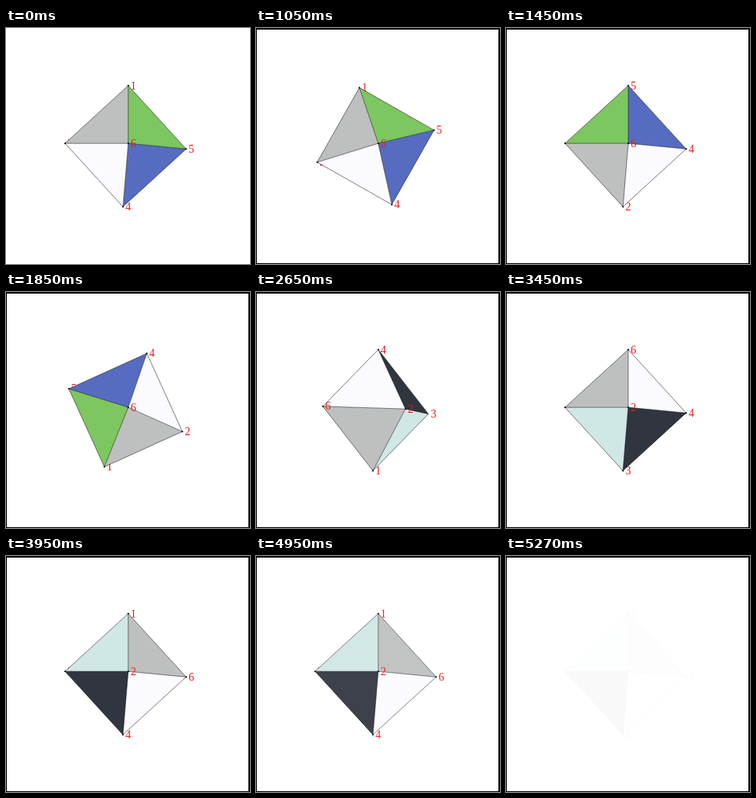
Write an HTML page with a canvas that moves like this. It is 305x295 px and loops after 5.33 s.

```html
<!DOCTYPE html>
<html lang="en">
<head>
<meta charset="utf-8">
<title>Turning octahedron</title>
<style>
  html, body { margin: 0; width: 100%; height: 100%; overflow: hidden; background: #fff; }
  canvas { display: block; }
</style>
</head>
<body>
<canvas id="stage" width="305" height="295"></canvas>
<script>
const ctx = document.getElementById('stage').getContext('2d');
const W = 305, H = 295;
const LOOP = 5330, HOLD = 1000, STEP = 50, FADE = 4950, FADE_STEP = 20;

const VERTS = {
  1: [0, 1, 0], 2: [-1, 0, 0], 3: [0, 0, -1],
  4: [0, -1, 0], 5: [1, 0, 0], 6: [0, 0, 1]
};
const FACES = [
  [1, 2, 6, '#bec0bf'], [1, 5, 6, '#7cc75f'],
  [4, 5, 6, '#566cc0'], [2, 4, 6, '#fafaff'],
  [1, 2, 3, '#cfe7e5'], [2, 3, 4, '#303540']
];

const rad = deg => deg * Math.PI / 180;
const clamp = (v, lo, hi) => Math.min(hi, Math.max(lo, v));

function spinZ([x, y, z], deg) {
  const c = Math.cos(rad(deg)), s = Math.sin(rad(deg));
  return [x * c - y * s, x * s + y * c, z];
}

function spinY([x, y, z], deg) {
  const c = Math.cos(rad(deg)), s = Math.sin(rad(deg));
  return [x * c - z * s, y, x * s + z * c];
}

// Slightly tilted orthographic view
function project([x, y, z]) {
  return {
    x: 149.5 + 75.7 * x + 3.3 * y + 3.3 * z,
    y: 147.7 + 3.5 * x - 75.7 * y - 3.5 * z,
    depth: z - 0.04 * x - 0.047 * y
  };
}

// Half turn in the plane, quarter turn about the upright axis, half turn back
function pose(n) {
  const points = {};
  for (const id in VERTS) {
    let v = spinZ(VERTS[id], 9 * clamp(n, 0, 20));
    v = spinY(v, 4.5 * clamp(n - 20, 0, 20));
    points[id] = project(spinZ(v, -9 * clamp(n - 40, 0, 20)));
  }
  return points;
}

function drawLabel(id, p) {
  ctx.fillStyle = '#f01818';
  ctx.fillText(id, p.x + 3, p.y + 4.5);
}

function drawDot(p) {
  ctx.fillStyle = '#000';
  ctx.beginPath();
  ctx.arc(p.x, p.y, 1, 0, 2 * Math.PI);
  ctx.fill();
}

function drawFace(pts, [a, b, c, color]) {
  ctx.fillStyle = color;
  ctx.beginPath();
  for (const id of [a, b, c]) ctx.lineTo(pts[id].x, pts[id].y);
  ctx.fill();
}

// Each edge once, even when two faces share it
function drawEdges(pts, faces) {
  const edges = new Set(faces.flatMap(([a, b, c]) => [`${a}${b}`, `${b}${c}`, `${a}${c}`]));
  ctx.strokeStyle = '#000';
  ctx.lineWidth = 0.5;
  for (const [a, b] of edges) {
    ctx.beginPath();
    ctx.moveTo(pts[a].x, pts[a].y);
    ctx.lineTo(pts[b].x, pts[b].y);
    ctx.stroke();
  }
}

function drawSolid(n) {
  const pts = pose(n);
  const ids = Object.keys(pts);
  const isFront = id => pts[id].depth > 0.3;
  const label = id => drawLabel(id, pts[id]);
  const visible = FACES.filter(([a, b, c]) =>
    pts[a].depth + pts[b].depth + pts[c].depth > 0);

  ids.filter(id => !isFront(id)).forEach(label);
  visible.forEach(face => drawFace(pts, face));
  drawEdges(pts, visible);
  ids.filter(id => pts[id].depth > -0.3).forEach(id => drawDot(pts[id]));
  ids.filter(isFront).forEach(label);
}

function drawBorder() {
  ctx.fillStyle = '#000';
  ctx.fillRect(0, 0, W, 2);
  ctx.fillRect(0, 0, 1, H);
  ctx.fillRect(W - 2, 0, 2, H);
  ctx.fillRect(0, H - 1, W, 1);
}

function render(t) {
  const n = t < HOLD ? 0 : Math.min(60, Math.floor((t - HOLD) / STEP) + 1);
  ctx.fillStyle = '#fff';
  ctx.fillRect(0, 0, W, H);
  ctx.font = '14px "Liberation Serif", "Noto Serif", serif';
  drawSolid(n);

  if (t >= FADE) {
    const k = Math.min(16, Math.floor((t - FADE) / FADE_STEP) + 1);
    ctx.fillStyle = `rgba(255, 255, 255, ${k / 16.5})`;
    ctx.fillRect(0, 0, W, H);
  }
  if (n > 0) drawBorder();
}

const start = performance.now();
function tick() {
  render((performance.now() - start) % LOOP);
  requestAnimationFrame(tick);
}
tick();
</script>
</body>
</html>
```
